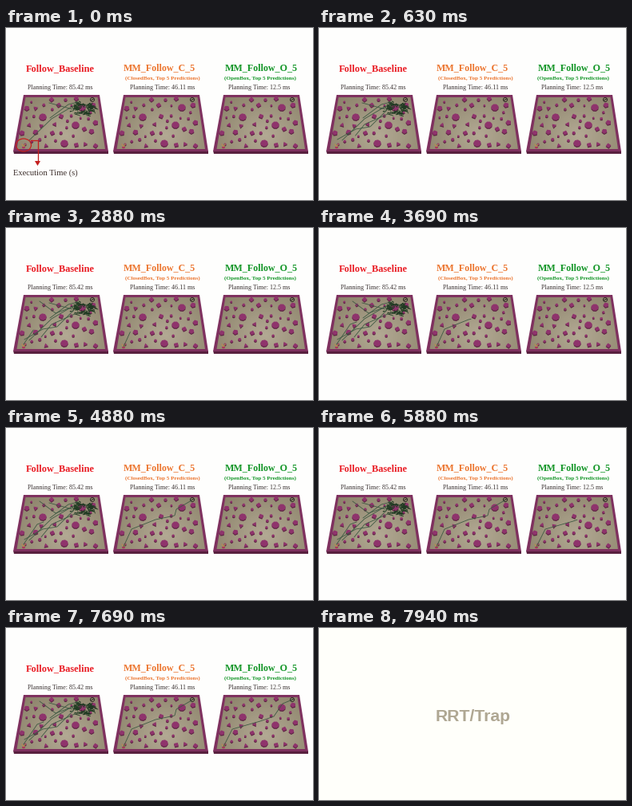
These frames come from a looping animation (384x216 px, 8 s). A matplotlib script:

```python
import math
import random

import matplotlib.pyplot as plt
import numpy as np
from matplotlib.animation import FuncAnimation
from matplotlib.collections import LineCollection, PolyCollection
from matplotlib.colors import LinearSegmentedColormap
from matplotlib.patches import Ellipse, Polygon, Rectangle

W, H, DPI = 384, 216, 100
STEP, LOOP = 50, 8000
PX = 72 / DPI

TOP, SIDE, RIM = "#8f336c", "#59203f", "#7f315f"
TRAIL, TREE = "#3a5741", "#1f3a22"
RED, ORANGE, GREEN = "#ea1c24", "#ec7630", "#149628"

NOTE_END, SLIDE_AT, FADE = 300, 7690, 250

# large blocks by number of sides: radius and centres in the first arena
LARGE = {
    8: (4.8, [(95, 100), (46, 112), (87, 122), (73, 145)]),
    5: (3.6, [(26, 101), (109, 97), (112, 119), (20, 132), (37, 131),
              (107, 130)]),
    4: (3.4, [(57, 90), (88, 89), (66, 97), (69, 111), (58, 132), (98, 127),
              (88, 147), (112, 148)]),
    3: (3.3, [(37, 101), (29, 122), (44, 123), (61, 121), (50, 148),
              (99, 146)]),
}

fig = plt.figure(figsize=(W / DPI, H / DPI), dpi=DPI, facecolor="#fefefd")
ax = fig.add_axes([0, 0, 1, 1])
ax.axis("off")


def make_blocks():
    """Large blocks plus small ones scattered over the free floor."""
    rng = random.Random(8)
    blocks = [(x, y, r, n) for n, (r, spots) in LARGE.items()
              for x, y in spots]
    for _ in range(400):
        y = rng.uniform(90, 150)
        lean = (y - 87) / 6
        x = rng.uniform(29 - lean, 103 + lean)
        clear = all(math.hypot(x - b[0], y - b[1]) > 6 + b[2] for b in blocks)
        if clear and len(blocks) < 45:
            blocks.append((x, y, rng.uniform(1.6, 2.3), rng.choice([4, 5, 6])))
    return [(*b, rng.uniform(0, 2 * math.pi)) for b in blocks]


def label(x, y, text, size, color, weight="normal", ha="center",
          family="Liberation Serif", z=5):
    return ax.text(x, y, text, fontsize=size * PX, color=color, weight=weight,
                   ha=ha, va="baseline", family=family, zorder=z)


def outline(x, y, r, n, turn):
    a = turn + np.arange(n) * 2 * math.pi / n
    return np.column_stack([x + r * np.cos(a), y + 0.9 * r * np.sin(a)])


def arena(dx, blocks):
    def poly(pts, color, z):
        return ax.add_patch(Polygon([(x + dx, y) for x, y in pts], fc=color,
                                    ec="none", zorder=z))

    poly([(9, 154), (128, 154), (128, 158), (10, 158)], SIDE, 1)
    poly([(22, 84), (117, 84), (128, 155), (9, 155)], RIM, 1.1)
    floor = poly([(24.5, 87), (114.5, 87), (124, 152), (13.5, 152)],
                 "none", 1.2)
    yy, xx = np.mgrid[0:1:40j, 0:1:40j]
    light = 1 - 1.1 * np.hypot(xx - 0.55, 0.7 * (yy - 0.72))
    cmap = LinearSegmentedColormap.from_list("floor", ["#81785f", "#b3aa94"])
    img = ax.imshow(light, cmap=cmap, vmin=0.1, vmax=1, zorder=1.2,
                    extent=(dx + 9, dx + 128, 155, 85), aspect="auto")
    img.set_clip_path(floor)

    tops = [outline(x + dx, y - 0.4, *rest) for x, y, *rest in blocks]
    ax.add_collection(PolyCollection([p + (0, 1.2) for p in tops], fc=SIDE,
                                     ec="none", zorder=2))
    ax.add_collection(PolyCollection(tops, fc=TOP, ec="none", zorder=2.1))

    # goal ring and robot
    ax.add_patch(Ellipse((dx + 108, 90), 5, 5, fc="none", ec="#1d1a18",
                         lw=0.8 * PX, zorder=3))
    ax.plot([dx + 106.5, dx + 109.5], [91, 89], color="#1d1a18", lw=0.8 * PX,
            zorder=3)
    ax.add_patch(Ellipse((dx + 22, 150), 4, 2.6, fc="#a8325c", ec="none",
                         zorder=3))
    ax.plot([dx + 20, dx + 22, dx + 24], [146, 149, 146],
            color="#b98a4a", lw=1.1 * PX, zorder=3)


def partial(pts, u):
    """First share u of a polyline, measured along its length."""
    pts = np.array(pts, float)
    d = np.r_[0, np.cumsum(np.hypot(*np.diff(pts, axis=0).T))]
    s = np.linspace(0, u * d[-1], 80)
    return np.interp(s, d, pts[:, 0]), np.interp(s, d, pts[:, 1])


def ramp(t, a, b):
    return min(max((t - a) / (b - a), 0), 1)


def make_tree():
    """Dense search tree around the trap."""
    rng = random.Random(11)
    for _ in range(75):
        a, r = rng.uniform(0, 2 * math.pi), rng.uniform(0.5, 1)
        x, y = 97 + 14 * r * math.cos(a), 101 + 7.5 * r * math.sin(a)
        yield [(x, y), (x + rng.uniform(-6, 6), y + rng.uniform(-3, 3)),
               (x + rng.uniform(-4, 4), y + rng.uniform(-3, 3))]


blocks = make_blocks()
for k in range(3):
    arena(125 * k, blocks)
ax.add_collection(LineCollection(list(make_tree()), colors=TREE, lw=0.7 * PX,
                                 zorder=3.5))

label(67.5, 54, "Follow_Baseline", 12.2, RED, "bold")
label(191.5, 53.5, "MM_Follow_C_5", 12, ORANGE, "bold")
label(319, 53.5, "MM_Follow_O_5", 12, GREEN, "bold")
label(195.5, 65, "(ClosedBox, Top 5 Predictions)", 7.15, ORANGE, "bold")
label(318, 65, "(OpenBox, Top 5 Predictions)", 7.15, GREEN, "bold")
for x, ms in ((67.5, "85.42"), (195.5, "46.11"), (317, "12.5")):
    label(x, 77, f"Planning Time: {ms} ms", 8.2, "#3c3434")

# trails: begin, end, points
TRAILS = [
    (-2, -1, [(29, 141), (57, 114), (84, 98)]),
    (-2, -1, [(54, 94), (83, 102)]),
    (-2, -1, [(55, 113), (78, 96), (90, 93)]),
    (60, 600, [(84, 104), (64, 124), (46, 127), (23, 140)]),
    (350, 1800, [(84, 99), (62, 107), (42, 92)]),
    (200, 620, [(86, 108), (57, 121), (44, 137)]),
    (1900, 3600, [(22, 146), (39, 121), (47, 118)]),
    (2440, 4700, [(147, 149), (157, 127), (187, 115), (211, 110),
                  (213, 102), (232, 91)]),
    (4900, 6500, [(272, 149), (283, 127), (318, 117), (335, 111),
                  (346, 95), (358, 90)]),
]
trails = [ax.plot([], [], color=TRAIL, lw=0.8 * PX, zorder=4)[0]
          for _ in TRAILS]

# execution note
INK = "#c4201f"
note = [
    ax.add_patch(Ellipse((22, 147), 19, 16, fc="none", ec=INK, lw=1.2 * PX,
                         zorder=6)),
    ax.plot([31, 39.5, 39.5], [141, 141, 169], color=INK, lw=1.3 * PX,
            zorder=6)[0],
    ax.add_patch(Polygon([(36, 167), (43, 167), (39.5, 173)], fc=INK,
                         ec="none", zorder=6)),
    label(9, 185, "Execution Time (s)", 10.5, "#3d2f2c", ha="left"),
]

cover = ax.add_patch(Rectangle((0, 0), W, H, fc="#fffffa", ec="none",
                               zorder=10))
heading = label(192.5, 117, "RRT/Trap", 21.2, "#a0967f", "bold",
                family="Liberation Sans", z=11)

ax.set_xlim(0, W)
ax.set_ylim(H, 0)


def update(i):
    t = i * STEP
    for line, (begin, end, pts) in zip(trails, TRAILS):
        u = ramp(t, begin, end)
        line.set_data(*partial(pts, u))
        line.set_visible(u > 0)
    for part in note:
        part.set_visible(t < NOTE_END)
    cover.set_visible(t >= SLIDE_AT)
    heading.set_visible(t >= SLIDE_AT)
    heading.set_alpha(ramp(t, SLIDE_AT, SLIDE_AT + FADE))
    return [*trails, *note, cover, heading]


anim = FuncAnimation(fig, update, frames=LOOP // STEP, interval=STEP,
                     repeat=True, repeat_delay=0)
plt.show()
```
